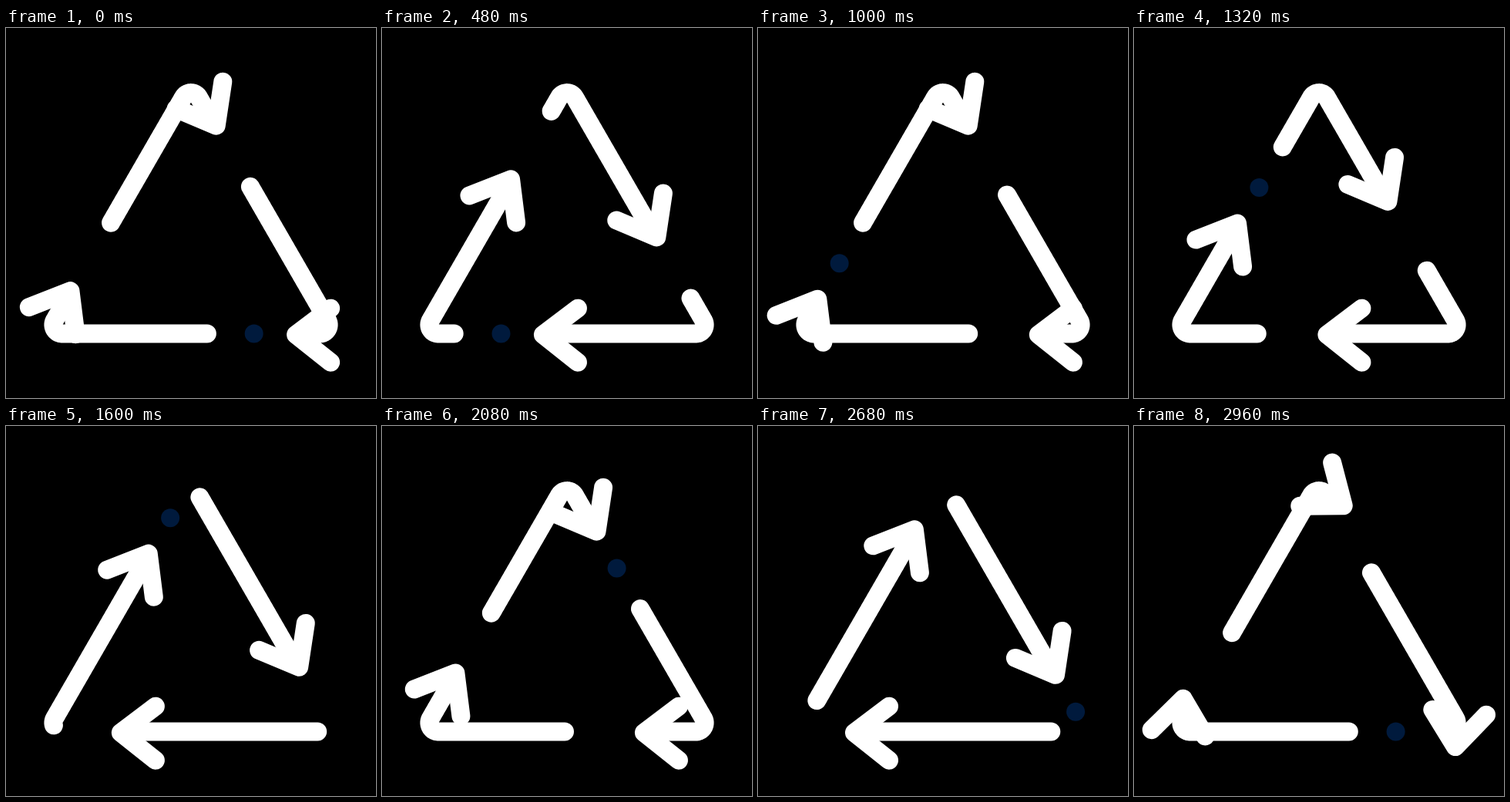
Recreate the animation shown at these times as an HTML page with a canvas. Size 480 px wide and 480 px high, loop 3 s.

```html
<!DOCTYPE html>
<html lang="en">
<head>
<meta charset="utf-8">
<title>Recycling arrows</title>
<style>
  html, body { margin: 0; width: 100%; height: 100%; overflow: hidden; background: #000; }
  canvas { display: block; width: 100vmin; height: 100vmin; }
</style>
</head>
<body>
<canvas id="stage" width="480" height="480"></canvas>
<script>
const ctx = document.getElementById('stage').getContext('2d');

// Rounded equilateral triangle, travelled clockwise from the lower left.
const SIDE = 374, RADIUS = 11.5, LEFT = 53, BASE = 396.5;
const CUT = RADIUS * Math.sqrt(3);
const STRAIGHT = SIDE - 2 * CUT;
const THIRD = STRAIGHT + RADIUS * Math.PI * 2 / 3;
const PERIMETER = THIRD * 3;
const CORNERS = [
  [LEFT, BASE],
  [LEFT + SIDE / 2, BASE - SIDE * Math.sqrt(3) / 2],
  [LEFT + SIDE, BASE]
];

const LOOP = 3000, STEP = 40, TICKS = 60;
const BODY = 225.3;
const TAILS = [146.2, THIRD + 133.9, 2 * THIRD + 146.2];
const DOT = 2 * THIRD + 85.4;

// Position and heading at distance s along the triangle.
function along(s) {
  s = ((s % PERIMETER) + PERIMETER) % PERIMETER;
  const side = Math.min(2, Math.floor(s / THIRD));
  const local = s - side * THIRD;
  const base = (side * 2 - 1) * Math.PI / 3;
  const run = CUT + Math.min(local, STRAIGHT);
  let x = CORNERS[side][0] + Math.cos(base) * run;
  let y = CORNERS[side][1] + Math.sin(base) * run;
  const turn = Math.max(0, local - STRAIGHT) / RADIUS;
  const angle = base + turn;
  x += RADIUS * (Math.sin(angle) - Math.sin(base));
  y += RADIUS * (Math.cos(base) - Math.cos(angle));
  return { x, y, angle };
}

function drawArrow(tail) {
  ctx.beginPath();
  for (let d = 0; d < BODY; d += 1.5) {
    const p = along(tail + d);
    ctx.lineTo(p.x, p.y);
  }
  const end = along(tail + BODY);
  ctx.lineTo(end.x, end.y);
  ctx.stroke();

  ctx.save();
  ctx.translate(end.x, end.y);
  ctx.rotate(end.angle);
  ctx.beginPath();
  ctx.moveTo(-15, -37.2);
  ctx.lineTo(30, -1.3);
  ctx.lineTo(-15, 32.8);
  ctx.stroke();
  ctx.restore();
}

function draw(ms) {
  const shown = Math.floor((ms % LOOP) / STEP) * STEP;
  const tick = Math.floor(shown * TICKS / 1000 + 1e-6);
  const shift = tick / (LOOP * TICKS / 1000) * PERIMETER;

  ctx.fillStyle = '#000';
  ctx.fillRect(0, 0, 480, 480);

  const dot = along(DOT + shift);
  ctx.fillStyle = '#001a3d';
  ctx.beginPath();
  ctx.arc(dot.x, dot.y, 12, 0, Math.PI * 2);
  ctx.fill();

  ctx.strokeStyle = '#fff';
  ctx.lineWidth = 24;
  ctx.lineCap = ctx.lineJoin = 'round';
  for (const tail of TAILS) drawArrow(tail + shift);
}

const start = performance.now();
function loop(now) {
  draw(Math.max(0, now - start));
  requestAnimationFrame(loop);
}
draw(0);
requestAnimationFrame(loop);
</script>
</body>
</html>
```
